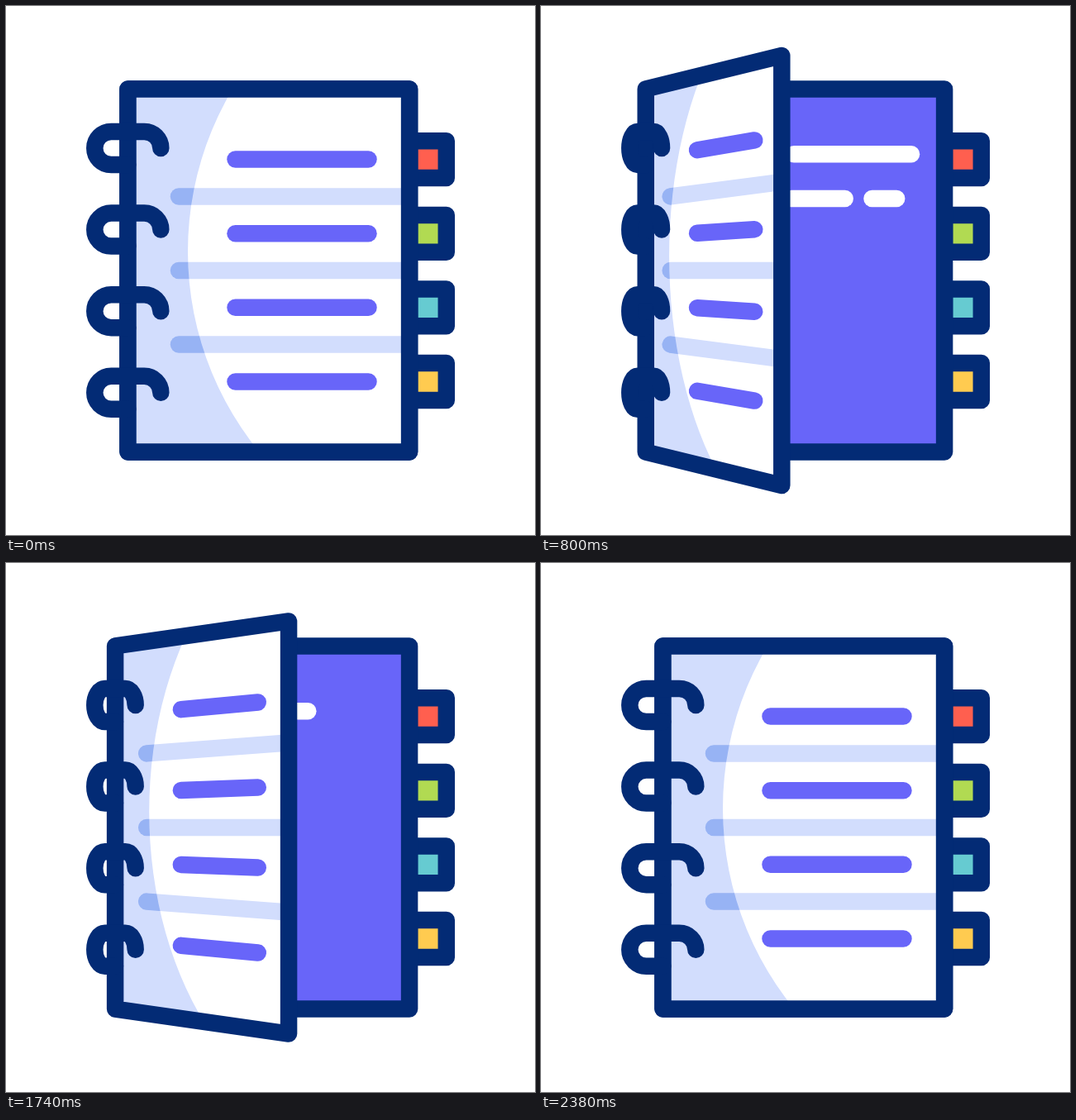
An HTML page with a canvas for the animation above (2400 ms loop, 640 px wide and 640 px high).

```html
<!DOCTYPE html>
<html lang="en">
<head>
<meta charset="utf-8">
<title>Notebook</title>
<style>
html, body { margin: 0; height: 100%; overflow: hidden; background: #fff; }
canvas { display: block; width: 640px; height: 640px; }
</style>
</head>
<body>
<canvas id="stage" width="640" height="640"></canvas>
<script>
const ctx = document.getElementById('stage').getContext('2d');
const LOOP = 2400, HALF = LOOP / 2, STROKE = 20.5;
const NAVY = '#032b75', PURPLE = '#6865f9', PALE = '#d2ddfd', BLUE = '#97b3f4';
const TABS = ['#ff5f4f', '#b1da52', '#66cbd1', '#ffcb50'];

// The page, and the row pitch shared by tabs, rules and bands.
const LEFT = 147.5, RIGHT = 488.1, MIDDLE = 320, REACH = 219.6, ROW = 89.6;

// Handwriting on the back page: x, y, length, in writing order.
const NOTES = [[306, 179.3, 142], [303, 233, 64.7], [400.5, 233, 47.5],
  [304.5, 280.3, 117], [304.5, 331.3, 138.5], [304.5, 386.3, 48.5]];
const NOTES_LENGTH = NOTES.reduce((sum, note) => sum + note[2], 0);

const smooth = u => u * u * (3 - 2 * u);
const ramp = (t, start, duration) => smooth(Math.min(1, Math.max(0, (t - start) / duration)));

// Cubic Bezier ease with control points (.738, 0) and (.247, 1).
function ease(u) {
  let lo = 0, hi = 1;
  for (let i = 0; i < 24; i++) {
    const t = (lo + hi) / 2, r = 1 - t;
    if (3 * r * r * t * .738 + 3 * r * t * t * .247 + t * t * t < u) lo = t; else hi = t;
  }
  return smooth(lo);
}

function stroke(path, color) {
  ctx.strokeStyle = color;
  ctx.stroke(path);
}

function fill(path, color) {
  ctx.fillStyle = color;
  ctx.fill(path);
}

function line(x1, y1, x2, y2) {
  const path = new Path2D();
  path.moveTo(x1, y1);
  path.lineTo(x2, y2);
  return path;
}

function box(x, y, w, h, color) {
  const path = new Path2D();
  path.rect(x, y, w, h);
  fill(path, color);
  stroke(path, NAVY);
}

function drawNotes(progress) {
  let left = progress * NOTES_LENGTH;
  for (const [x, y, length] of NOTES) {
    if (left <= 0) return;
    stroke(line(x, y, x + Math.min(length, left), y), '#fff');
    left -= length;
  }
}

function coverPath(s) {
  const near = LEFT - 23.4 * s, far = RIGHT - 222 * s, farReach = REACH + 45.6 * s;
  const path = line(near, MIDDLE + REACH, near, MIDDLE - REACH);
  path.lineTo(far, MIDDLE - farReach);
  path.lineTo(far, MIDDLE + farReach);
  path.closePath();
  return path;
}

// Everything left of a large ellipse that narrows as the cover turns.
function shadePath(s) {
  const turn = s * (1 + .9 * (s - .7) ** 2);
  const rx = 384 - 182 * turn, edge = 220 - 71 * turn;
  const path = new Path2D();
  path.ellipse(edge + rx, 297 + 6 * turn, rx, 384, 0, Math.PI / 2, Math.PI * 1.5);
  path.lineTo(0, -90);
  path.lineTo(0, 690);
  path.closePath();
  return path;
}

function drawCover(s) {
  const outline = coverPath(s), shade = shadePath(s);
  const bands = [-1, 0, 1].map(k => {
    const y = MIDDLE + ROW * k;
    return line(209 - 59 * s, y, 484 - 222 * s, y + 19.3 * k * s);
  });
  fill(outline, '#fff');
  ctx.save();
  ctx.clip(outline);
  fill(shade, PALE);
  bands.forEach(band => stroke(band, PALE));
  ctx.clip(shade);
  bands.forEach(band => stroke(band, BLUE));
  ctx.restore();
  for (let k = -1.5; k < 2; k++) {
    const y = MIDDLE + ROW * k;
    const tilt = k * (10.2 + 3.2 * k * k);
    stroke(line(277.5 - 99.8 * s, y + 3.8 * k ** 3 * s, 438.5 - 203.3 * s, y + tilt * s), PURPLE);
  }
  stroke(outline, NAVY);
}

function drawRing(y, s) {
  const r = 20, squeeze = 1 - .582 * s, x = d => 107.3 + d * squeeze;
  const path = line(x(2 * r), y + r, x(r), y + r);
  path.ellipse(x(r), y, r * squeeze, r, 0, Math.PI / 2, Math.PI * 1.5);
  path.ellipse(x(3 * r), y, r * squeeze, r, 0, -Math.PI / 2, 0);
  stroke(path, NAVY);
}

function draw(time) {
  const t = time % LOOP;
  const open = t < HALF ? ease(t / HALF) : 1 - ease(t / HALF - 1);
  ctx.clearRect(0, 0, 640, 640);
  ctx.lineWidth = STROKE;
  ctx.lineCap = ctx.lineJoin = 'round';
  TABS.forEach((color, i) => box(RIGHT, 163.3 + ROW * i, 44.7, 44.8, color));
  box(LEFT, MIDDLE - REACH, RIGHT - LEFT, 2 * REACH, PURPLE);
  drawNotes(ramp(t, 608, 430) - ramp(t, 1398, 430));
  drawCover(open);
  for (let i = 0; i < 4; i++) drawRing(172 + 98.6 * i, open);
}

function tick() {
  draw(performance.now());
  requestAnimationFrame(tick);
}
tick();
</script>
</body>
</html>
```
